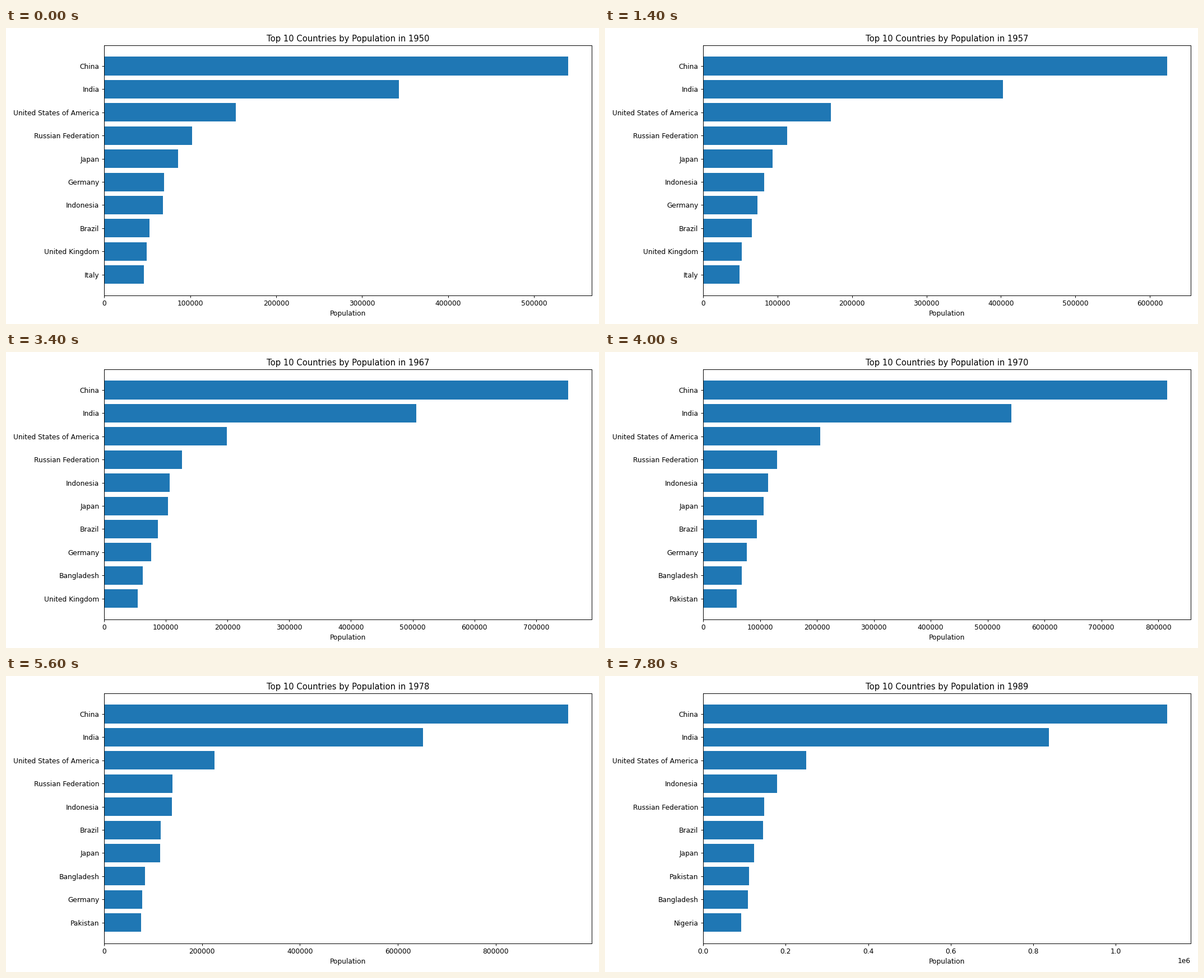
Write a matplotlib script that moves like this. It is 1058x529 px and loops after 8 s.

```python
import math

import matplotlib.pyplot as plt
from matplotlib.animation import FuncAnimation

START, COUNT, TOP = 1950, 40, 10

# Millions in the first and last year, and how far growth bows in between
GROWTH = {
    "China": (539.7, 1124.9, 0.045),
    "India": (342.7, 837.9, 0),
    "United States of America": (153.1, 249.7, 0.047),
    "Russian Federation": (102.4, 148.2, 0.052),
    "Japan": (85.8, 122.9, 0.035),
    "Germany": (69.6, 78.0, 0.042),
    "Indonesia": (68.1, 179.1, 0.02),
    "Brazil": (52.5, 145.5, 0.066),
    "United Kingdom": (49.7, 57.0, 0.035),
    "Italy": (46.3, 57.0, 0.03),
    "Bangladesh": (39.4, 108.5, 0.022),
    "Pakistan": (37.0, 110.9, -0.095),
    "Nigeria": (30.0, 93.0, 0.045),
}


def population(name, year):
    """Geometric growth with a parabolic bow, in thousands."""
    first, last, bow = GROWTH[name]
    t = (year - START) / (COUNT - 1)
    rate = t * math.log(last / first) + 4 * bow * t * (1 - t)
    if name == "China":  # slump of the early sixties
        rate -= 0.063 * math.exp(-((year - 1963) / 4.9) ** 2)
    return 1000 * first * math.exp(rate)


fig, ax = plt.subplots(figsize=(12, 6), dpi=1058 / 12)
MARGINS = dict(left=198.5 / 1200, top=1 - 35.3 / 600, bottom=58.3 / 600)


def update(n):
    year = START + n
    pops = {name: population(name, year) for name in GROWTH}
    names = sorted(pops, key=pops.get, reverse=True)[:TOP]
    ax.clear()
    ax.barh(names, [pops[name] for name in names], color="#1f77b4")
    ax.invert_yaxis()
    ax.set_xlabel("Population")
    ax.set_title(f"Top 10 Countries by Population in {year}")
    # The right margin makes room for a tick label at the edge
    fig.subplots_adjust(right=0.9875, **MARGINS)
    fig.tight_layout()
    fig.subplots_adjust(**MARGINS)
    return []


anim = FuncAnimation(fig, update, frames=COUNT, interval=200,
                     init_func=lambda: [], repeat=True, repeat_delay=0)
plt.show()
```
